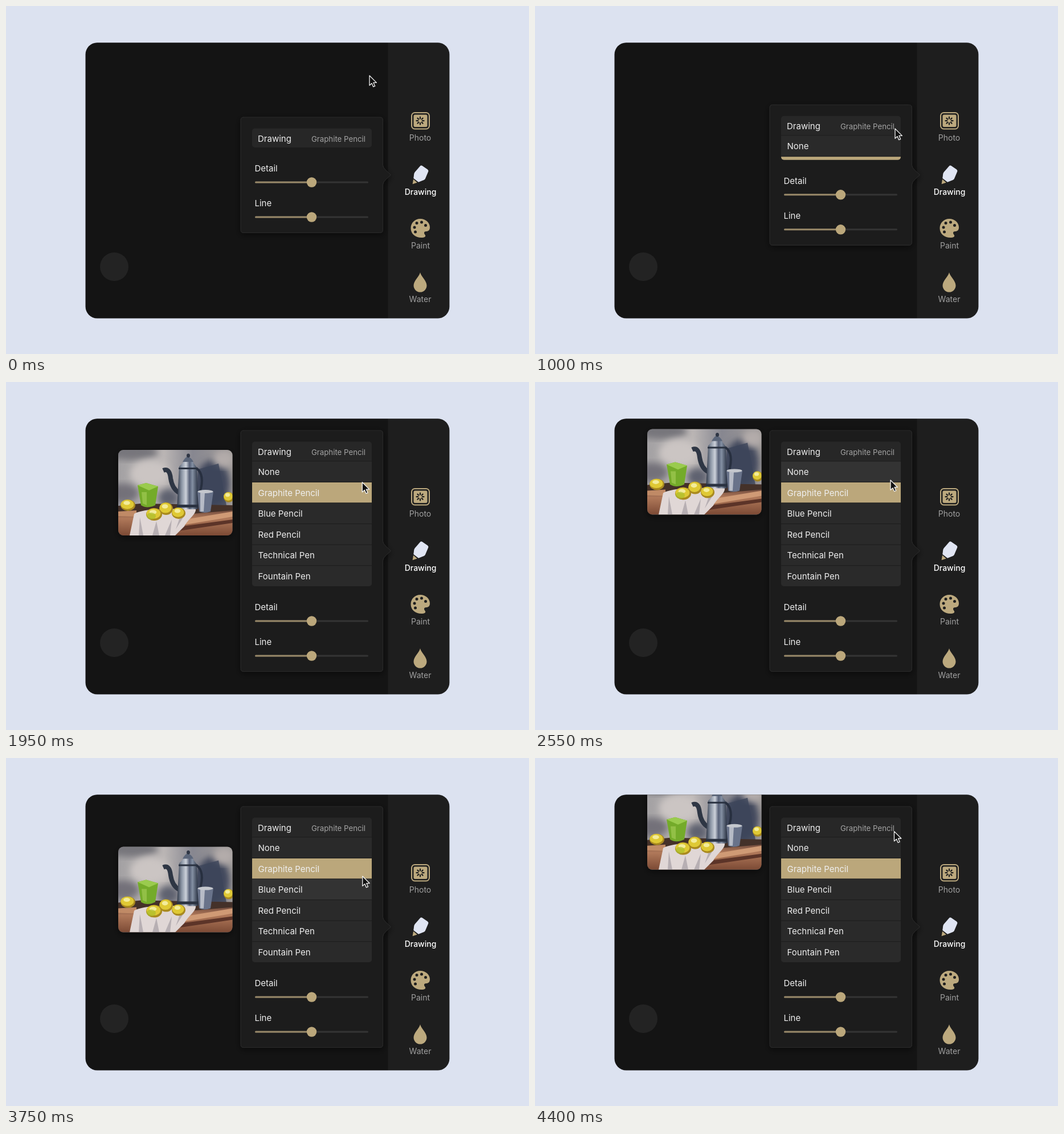
These frames come from a looping animation (918x610 px, 4.45 s). An HTML page:

```html
<!DOCTYPE html>
<html lang="en">
<head>
<meta charset="utf-8">
<title>Drawing style menu</title>
<style>
  html, body { margin: 0; width: 100%; height: 100%; overflow: hidden; background: #dce2f0; }
  svg { display: block; width: 918px; height: 610px; }
  text { font-family: Inter, Roboto, sans-serif; font-size: 15px; fill: #efefef; }
  .side text { font-size: 14px; fill: #a0a0a0; text-anchor: middle; }
  .side .active { fill: #fff; font-weight: 500; }
  .value { font-size: 13.25px; fill: #a3a3a3; text-anchor: end; }
</style>
</head>
<body>
<svg viewBox="0 0 918 610">
  <defs>
    <clipPath id="windowClip"><rect x="139.5" y="64.3" width="639" height="483.2"/></clipPath>
    <clipPath id="listClip"><rect id="listShape" x="432" width="210" rx="5"/></clipPath>
    <clipPath id="thumbClip"><rect width="200.5" height="150" rx="9"/></clipPath>
    <filter id="shadow" x="-20%" y="-20%" width="140%" height="140%">
      <feDropShadow dx="0" dy="3" stdDeviation="6" flood-color="#000" flood-opacity=".55"/>
    </filter>
    <filter id="soft" x="-20%" y="-20%" width="140%" height="140%"><feGaussianBlur stdDeviation="6"/></filter>
    <filter id="brush" x="-5%" y="-5%" width="110%" height="110%"><feGaussianBlur stdDeviation=".7"/></filter>
    <linearGradient id="windowFill" gradientUnits="userSpaceOnUse" x1="670" x2="671">
      <stop stop-color="#141414"/><stop offset="1" stop-color="#1e1e1e"/>
    </linearGradient>
    <linearGradient id="wall">
      <stop offset="0" stop-color="#a3a1a3"/><stop offset=".4" stop-color="#bbb6b5"/>
      <stop offset=".65" stop-color="#878790"/><stop offset="1" stop-color="#a09b99"/>
    </linearGradient>
    <linearGradient id="metal">
      <stop offset="0" stop-color="#2d3544"/><stop offset=".22" stop-color="#8b95a5"/>
      <stop offset=".42" stop-color="#ccd1da"/><stop offset=".58" stop-color="#566077"/>
      <stop offset=".72" stop-color="#8490a3"/><stop offset="1" stop-color="#222a3a"/>
    </linearGradient>
    <linearGradient id="wood" x2="0" y2="1">
      <stop offset="0" stop-color="#5a3b33"/><stop offset=".4" stop-color="#b0795a"/>
      <stop offset="1" stop-color="#7c4a35"/>
    </linearGradient>
  </defs>

  <rect width="918" height="610" fill="#dce2f0"/>
  <rect x="139.500" y="64.300" width="638.900" height="483.200" rx="20.500" fill="url(#windowFill)"/>
  <circle cx="190" cy="457" r="25" fill="#232323"/>

  <g clip-path="url(#windowClip)">
    <g id="thumb">
      <rect width="200.5" height="150" rx="9" fill="#444" filter="url(#shadow)"/>
      <g clip-path="url(#thumbClip)"><g id="painting" filter="url(#brush)"></g></g>
    </g>
  </g>

  <g class="side">
    <rect x="712" y="187" width="31" height="28.500" rx="5.500" fill="none" stroke="#bca97e" stroke-width="2"/>
    <rect x="715.5" y="190.5" width="24" height="21.500" rx="2.500" fill="#bca97e"/>
    <g id="petals" stroke="#1e1e1e" stroke-width="2.2" stroke-linecap="round"></g>
    <path d="M727 280.500Q728.500 278.800 730.500 280L740 286.500Q742 288 741.300 290L736 302.500Q735.300 304.200 733.500 305L724 308.800L715.300 302L716.200 294.500Q716.500 292.500 717.800 291Z" fill="#e0e5f3"/>
    <path d="M715 303.800L721.800 309.600L713.600 312.300Z" fill="#bca97e"/>
    <path d="M727 373C737 373 744 380 744 388C744 393 741 395 738 395C733.500 395 733 398 735.500 401C737.500 404 735 406 729 406C718 406 710.500 399 710.500 389.500C710.500 380 718 373 727 373Z" fill="#bca97e"/>
    <g id="wells" fill="#1e1e1e"></g>
    <path d="M727 467C729 475 738.500 481.500 738.500 490A11.500 11.500 0 0 1 715.500 490C715.500 481.500 725 475 727 467Z" fill="#bca97e"/>
    <text x="727" y="236">Photo</text>
    <text x="727.500" y="330.500" class="active">Drawing</text>
    <text x="727.500" y="425">Paint</text>
    <text x="727" y="519">Water</text>
  </g>

  <path id="popup" fill="#1f1f1f" stroke="#2b2b2b" filter="url(#shadow)"/>
  <g clip-path="url(#listClip)">
    <rect x="432" y="64" width="210" height="484" fill="#272727"/>
    <g id="list"></g>
  </g>
  <g id="sliders"></g>

  <path id="cursor" d="M0 0V17.200L4 13.600L6.700 19.700L9.700 18.400L7 12.400H12.400Z" fill="#111" stroke="#f2f2f2" stroke-width="1.300" stroke-linejoin="round"/>
</svg>

<script>
const $ = id => document.getElementById(id);
const move = (id, x, y) => $(id).setAttribute('transform', `translate(${x} ${y})`);

const LOOP = 4450, STEP = 50;
const ROW = 36.6, LIST_TOP = 139, GROW = 110, SELECTED = 1;
const HOVER_LAG = 80, HOVER_START = 1700;
const GOLD = '#bba77b', ROW_FILL = '#2a2a2a', HOVER_FILL = '#333';

const label = (x, y, text, cls = '') => `<text x="${x}" y="${y}" class="${cls}">${text}</text>`;
const blob = (x, y, rx, ry, fill, extra = '') =>
  `<ellipse cx="${x}" cy="${y}" rx="${rx}" ry="${ry}" fill="${fill}" ${extra}/>`;
const shape = (d, fill, extra = '') => `<path d="${d}" fill="${fill}" ${extra}/>`;

// List coordinates are those of the open menu.
const styles = ['None', 'Graphite Pencil', 'Blue Pencil', 'Red Pencil', 'Technical Pen', 'Fountain Pen'];
$('list').innerHTML =
  label(442, 127.5, 'Drawing') + label(631, 127.5, 'Graphite Pencil', 'value') +
  styles.map((name, i) => {
    const y = LIST_TOP + i * ROW;
    return `<rect x="432" y="${y - 0.6}" width="210" height="1" fill="#1b1b1b"/>` +
      `<rect class="row" x="432" y="${y + 0.4}" width="210" height="${ROW - 1}"/>` +
      label(442.5, y + 24, name);
  }).join('');
const rows = [...document.querySelectorAll('.row')];

const slider = (name, y) => label(436.5, y - 19, name) +
  `<rect x="437" y="${y - 1.5}" width="199" height="3" rx="1.5" fill="#343434"/>` +
  `<rect x="437" y="${y - 1.5}" width="100" height="3" rx="1.5" fill="#988868"/>` +
  blob(536.5, y, 8.7, 8.7, GOLD);
$('sliders').innerHTML = slider('Detail', 309) + slider('Line', 370);

$('petals').innerHTML = Array.from({ length: 8 }, (_, i) =>
  `<path d="M727 197.400V194.700" transform="rotate(${i * 45} 727 201.200)"/>`).join('');
$('wells').innerHTML = [[717, 388], [721, 380.5], [729.5, 379], [736.5, 384.5], [718.5, 396]]
  .map(([x, y]) => blob(x, y, 2.5, 2.5, '#1e1e1e')).join('');

const lemon = (x, y, rx, ry) => blob(x, y, rx, ry, '#a98a1f') +
  blob(x - 1, y - 1.5, rx * .88, ry * .82, '#dfc935') + blob(x - 2, y - 4, rx * .45, ry * .35, '#f3ec9a');
const softly = 'filter="url(#soft)"';
$('painting').innerHTML =
  '<rect width="201" height="150" fill="url(#wall)"/>' +
  blob(25, 4, 45, 14, '#77767b', softly) + blob(55, 42, 34, 24, '#cbc5c3', softly) +
  blob(8, 76, 28, 17, '#737179', softly) + blob(88, 84, 18, 16, '#5f626f', softly) +
  blob(166, 60, 30, 42, '#3f465c', softly) + blob(185, 16, 18, 15, '#b3acaa', softly) +
  shape('M140 34L176 24L190 98H138Z', '#3d455b', 'opacity=".8"') +
  '<rect y="100" width="201" height="50" fill="url(#wood)"/>' +
  shape('M0 98L40 94L201 97V106L130 112H0Z', '#443129') +
  shape('M118 122L201 108V117L112 132Z', '#cf9a75') +
  shape('M112 134L201 122V128L106 142Z', '#5c3428') +
  shape('M0 108L32 106V117L0 116Z', '#c08a66') +
  shape('M79 36Q90 31 92 50Q95 69 107 75', 'none', 'stroke="#2e3644" stroke-width="8"') +
  shape('M107 29L116 20H130L138 31L141 103Q122 109 103 103Z', 'url(#metal)') +
  shape('M113 21Q118 12 122 12Q128 13 132 21Z', '#5a6579') + blob(123, 10, 3, 3.5, '#2f3645') +
  shape('M137 32Q153 43 143 76', 'none', 'stroke="#272f3f" stroke-width="4"') +
  shape('M106 31H138V34H106ZM103 96H141V101H103Z', '#2a3241') +
  shape('M139 73H167L162 108Q151 112 142 108Z', '#69738a') +
  shape('M144 75H152L150 108H144Z', '#b6bbc6') + blob(153, 73, 13.5, 3, '#c4c7cd') +
  shape('M34 62L49 58L70 64L65 97Q51 104 40 97Z', '#74ab2a') +
  shape('M34 62L49 58L70 64L54 71Z', '#9acb4e') + shape('M41 74H50V97L43 94Z', '#92c046') +
  shape('M28 112C45 102 94 103 136 104C137 113 122 122 116 134L100 150H20Z', '#e0d7d6') +
  shape('M38 118L44 150H36ZM67 125L72 150H60ZM94 122L91 150H82ZM118 112L101 139L109 116Z', '#a69ea4', 'opacity=".7"') +
  lemon(17, 97, 13, 10) + lemon(194, 83, 9, 9) + lemon(84, 103, 12, 11) +
  lemon(106, 111, 12, 10) + lemon(63, 113, 14, 11) + blob(58, 116, 8, 6, '#a9bd2c', 'opacity=".7"');

const ease = p => { p = Math.min(1, Math.max(0, p)); return p * p * (3 - 2 * p); };

// Resting points of the pointer: time, x, y.
const stops = [
  [0, 638, 122], [700, 632, 215], [1600, 632, 215], [2000, 625, 174],
  [2600, 624, 172], [3150, 622, 270], [4450, 630.5, 128]
];
function pointer(t) {
  const i = Math.max(1, stops.findIndex(s => s[0] >= t));
  const [a, b] = [stops[i - 1], stops[i]];
  const p = ease((t - a[0]) / (b[0] - a[0]));
  return [a[1] + (b[1] - a[1]) * p, a[2] + (b[2] - a[2]) * p];
}

function render(t) {
  const grow = GROW * ease((t - 900) / 350);
  const top = 195 - grow, bottom = 397.5 + grow;
  $('popup').setAttribute('d',
    `M417 ${top}H656.500Q661.500 ${top} 661.500 ${top + 5}V279Q662 284 667 288L675.500 296L667 304Q662 308 661.500 313` +
    `V${bottom - 5}Q661.500 ${bottom} 656.500 ${bottom}H417Q412 ${bottom} 412 ${bottom - 5}V${top + 5}Q412 ${top} 417 ${top}Z`);
  $('listShape').setAttribute('y', 214.5 - grow);
  $('listShape').setAttribute('height', 33.5 + 2 * grow);
  move('list', 0, GROW - grow);
  move('sliders', 0, grow);
  move('cursor', ...pointer(t));

  // The preview snaps to the row under the pointer, a moment late.
  const hovering = t >= HOVER_START;
  const hoverY = pointer(Math.max(0, t - HOVER_LAG))[1];
  const hovered = Math.floor((hoverY - LIST_TOP) / ROW);
  $('thumb').style.display = hovering ? '' : 'none';
  move('thumb', 197, 119 + (hovered - 1) * ROW);
  rows.forEach((row, i) => row.setAttribute('fill',
    i === SELECTED ? GOLD : hovering && i === hovered ? HOVER_FILL : ROW_FILL));
}

const start = performance.now();
function tick() {
  const t = (performance.now() - start) % LOOP;
  render(Math.floor(t / STEP) * STEP);
  requestAnimationFrame(tick);
}
tick();
</script>
</body>
</html>
```
